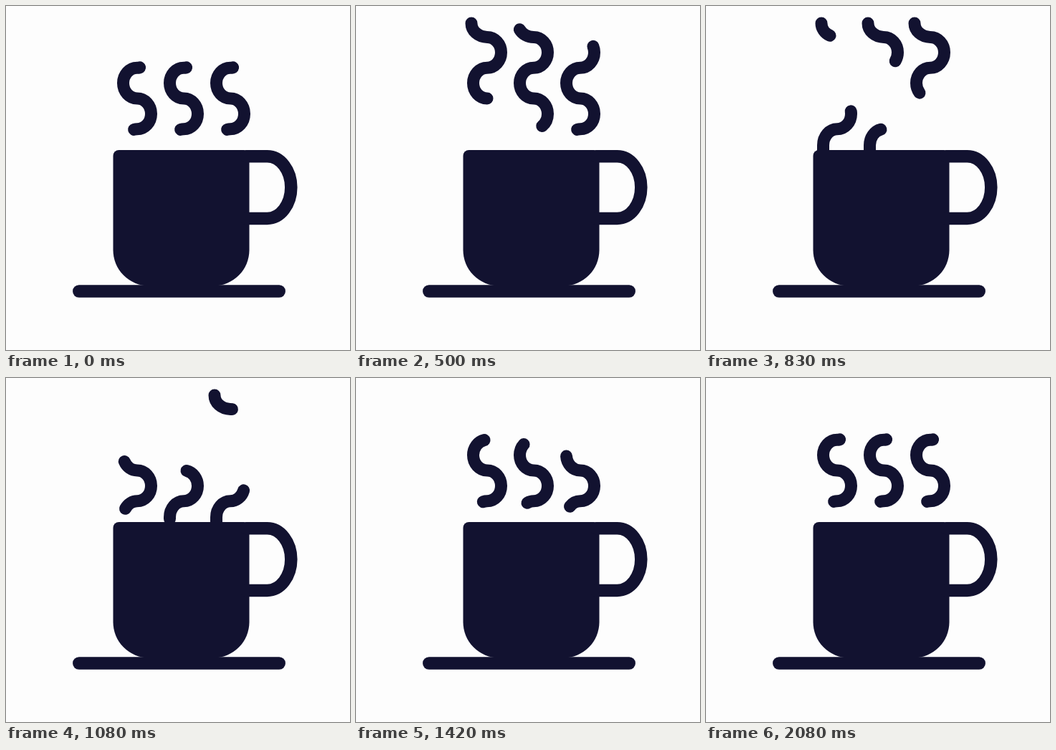
An HTML page with a canvas for the animation above (3080 ms loop, 480 by 480 pixels).

```html
<!DOCTYPE html>
<html lang="en">
<head>
<meta charset="utf-8">
<title>Steaming cup</title>
<style>
html, body { margin: 0; width: 100%; height: 100%; overflow: hidden; background: #fdfdfd; }
canvas { display: block; width: 480px; height: 480px; }
</style>
</head>
<body>
<canvas id="stage" width="480" height="480"></canvas>
<script>
const ctx = document.getElementById('stage').getContext('2d');
const LOOP = 3080, PAPER = '#fdfdfd', INK = '#121230';
const STAGGER = 145, SPACING = 65;

// Distances along a wisp, measured from its lower bend
const ORIGIN = 61, FLOOR = -60, TOP = 225, REST_TAIL = -5, REST_HEAD = 131;

const clamp = (v, lo, hi) => Math.min(hi, Math.max(lo, v));
const mix = (a, b, k) => a + (b - a) * k;
const smooth = (t, start, span) => {
  const u = clamp((t - start) / span, 0, 1);
  return u * u * (3 - 2 * u);
};
// Distance still to go, for parts that slow into their rest place
const remaining = (t, end, span, amount, power) =>
  amount * Math.pow(Math.max(0, end - t) / span, power);

function wispPath() {
  const p = new Path2D(), x = 183, rx = 19.5, ry = 21.4, q = Math.PI / 2;
  p.moveTo(x - rx, 222);
  p.lineTo(x - rx, 194.3);
  p.ellipse(x, 194.3, rx, 22.5, 0, 2 * q, 3 * q);
  p.ellipse(x, 150.4, rx, ry, 0, q, -q, true);
  p.ellipse(x, 107.6, rx, ry, 0, q, 3 * q);
  p.ellipse(x, 64.8, rx, ry, 0, q, -q, true);
  p.ellipse(x, 24, 22, 19.4, 0, q, 2 * q);
  return p;
}
const WISP = wispPath();

function drawPiece(tail, head) {
  tail = clamp(tail, FLOOR, TOP);
  head = clamp(head, FLOOR, TOP);
  if (head - tail < 1) return;
  ctx.setLineDash([head - tail, 999]);
  ctx.lineDashOffset = -(tail + ORIGIN);
  ctx.stroke(WISP);
}

function drawWisp(i, time) {
  const t = time - i * STAGGER;
  ctx.save();
  ctx.translate(i * SPACING, 0);
  ctx.lineWidth = 17;

  const leavingTail = mix(REST_TAIL, TOP, smooth(t, 230, 750));
  const leavingHead = mix(REST_HEAD, TOP, smooth(t, 40, 400));
  if (leavingTail < 217) drawPiece(leavingTail, leavingHead);

  drawPiece(
    REST_TAIL - remaining(t, 1700, 620, 16, 3.1),
    REST_HEAD - remaining(t, 1720, 1035, 136, 2.3)
  );
  ctx.restore();
}

function drawCup() {
  ctx.lineWidth = 17.5;
  ctx.beginPath();
  ctx.roundRect(149.5, 201, 190, 189.5, [8, 8, 50, 50]);
  ctx.fill();

  ctx.beginPath();
  ctx.moveTo(335, 209.8);
  ctx.lineTo(364.5, 209.8);
  ctx.ellipse(364.5, 253.1, 33.3, 43.3, 0, -Math.PI / 2, Math.PI / 2);
  ctx.lineTo(335, 296.4);
  ctx.stroke();

  ctx.beginPath();
  ctx.moveTo(101.8, 398);
  ctx.lineTo(381.2, 398);
  ctx.stroke();
}

function draw(time) {
  ctx.fillStyle = PAPER;
  ctx.fillRect(0, 0, 480, 480);
  ctx.fillStyle = ctx.strokeStyle = INK;
  ctx.lineCap = 'round';
  for (let i = 0; i < 3; i++) drawWisp(i, time);
  drawCup();
}

const begin = performance.now();
function tick() {
  draw((performance.now() - begin) % LOOP);
  requestAnimationFrame(tick);
}
tick();
</script>
</body>
</html>
```
